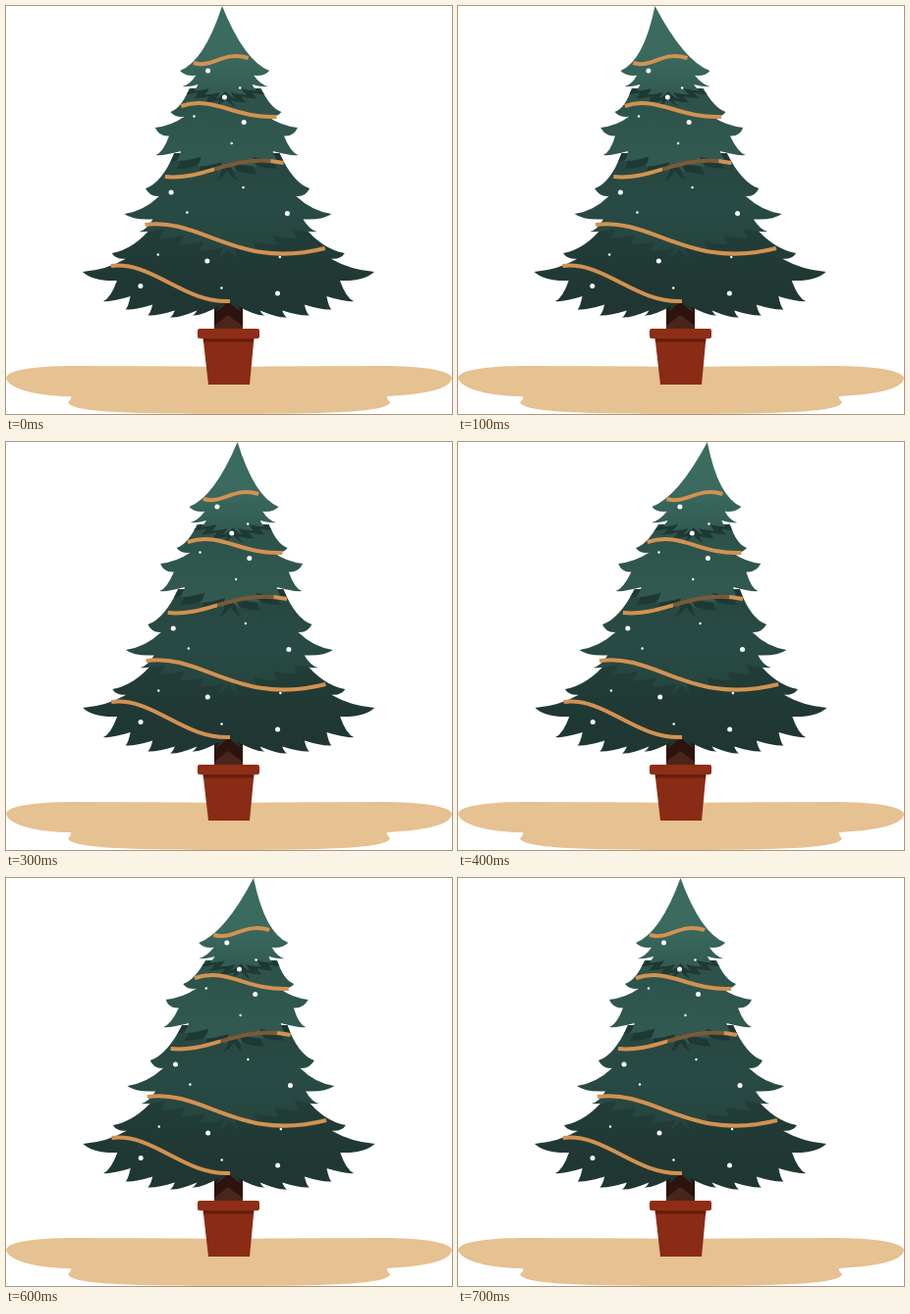
An HTML page with a canvas that plays this animation: 454 px wide and 416 px high, repeating every 800 ms.

```html
<!DOCTYPE html>
<html lang="en">
<head>
<meta charset="utf-8">
<title>Swaying tree</title>
<style>
  html, body { margin: 0; width: 100%; height: 100%; overflow: hidden; background: #fff; }
  canvas { display: block; }
</style>
</head>
<body>
<canvas id="stage" width="454" height="416"></canvas>
<script>
const ctx = document.getElementById('stage').getContext('2d');
const STEP = 100, STEPS = 8, MID = 226.5, ROOT = 325;
const GOLD = '#d39250', SHADED_GOLD = '#7c5a35', SHADOW = '#1e3833';
let lean = 0;

const lerp = (a, b, u) => a + (b - a) * u;

// Sideways shift of the tree at height y
const bend = y => lean * Math.pow(Math.max(0, ROOT - y) / ROOT, 2.25);

// Tiers from the bottom up: left branch tips, then a hem running to the middle
const tiers = [
  { colors: ['#223d38', '#1f3632'], shoulder: [150, 224], tips: [[108, 252], [78, 271], [99, 301]],
    hem: { end: [212, 311], count: 5, sag: 11, depth: 8 } },
  { colors: ['#264740', '#294b45', '#25443e'], shoulder: [173, 150], tips: [[143, 186], [121, 212], [136, 230]],
    hem: { end: [216, 256], count: 4, sag: 0, depth: 6 } },
  { colors: ['#2b5048', '#2f574e', '#325a51'], shoulder: [190, 84], tips: [[170, 108], [154, 124], [154, 152]],
    hem: { end: [216, 169], count: 3, sag: 0, depth: 7 }, shade: 8 },
  { colors: ['#3a6c60', '#3b6a5f', '#315a51'], shoulder: [MID, 0], tips: [[181, 66], [183, 82]],
    hem: { end: [216, 94], count: 3, sag: 0, depth: 5 }, shade: 8 }
];

// Cubic curves: start, two controls, end
const garlands = [
  [195, 58, 215, 64, 225, 45, 251, 53],
  [181, 102, 215, 91, 235, 115, 278, 113],
  [163, 174, 205, 178, 230, 150, 284, 160],
  [142, 223, 200, 215, 235, 270, 325, 247],
  [107, 265, 150, 260, 180, 303, 228, 301]
];

// Large and small lights take turns
const lights = [
  [209.5, 66], [241.5, 83.5], [225.5, 93], [194, 112.5], [244.5, 118.5], [231.5, 140],
  [169, 190], [242.5, 185], [287, 211.5], [185, 210.5], [205, 260], [155, 253.5],
  [137, 285.5], [279, 256], [276.5, 293], [219.5, 287.5]
];

// Left half of a tier as a start point followed by control/end pairs
function halfOutline({ shoulder, tips, hem }) {
  const pts = [shoulder];
  let tip;
  const growTo = next => {
    const from = pts[pts.length - 1];
    pts.push([lerp(from[0], next[0], 0.45), lerp(from[1], next[1], 0.85)], next);
    tip = next;
  };
  const cutTo = notch => {
    pts.push([lerp(tip[0], notch[0], 0.3), Math.max(tip[1], notch[1]) + 1], notch);
  };

  growTo(tips[0]);
  for (const next of tips.slice(1)) {
    cutTo([Math.max(tip[0], next[0]) + 14, lerp(tip[1], next[1], 0.3)]);
    growTo(next);
  }
  const start = tip;
  for (let i = 1; i <= hem.count; i++) {
    const u = i / hem.count;
    const next = [
      lerp(start[0], hem.end[0], u),
      lerp(start[1], hem.end[1], u) + hem.sag * Math.sin(Math.PI * u)
    ];
    cutTo([next[0] + 5, Math.min(tip[1], next[1]) - hem.depth + 3]);
    growTo(next);
  }
  cutTo([MID, hem.end[1] - hem.depth - 2]);
  return pts;
}

function symmetric(half, drop = 0) {
  const mirrored = half.map(([x, y]) => [2 * MID - x, y]).reverse();
  const pts = half.concat(mirrored.slice(1)).map(([x, y]) => [x + bend(y), y + drop]);
  const path = new Path2D();
  path.moveTo(...pts[0]);
  for (let i = 1; i + 1 < pts.length; i += 2) path.quadraticCurveTo(...pts[i], ...pts[i + 1]);
  path.closePath();
  return path;
}

for (const tier of tiers) tier.half = halfOutline(tier);

function fill(path, color) {
  ctx.fillStyle = color;
  ctx.fill(typeof path === 'string' ? new Path2D(path) : path);
}

function drawBase() {
  fill('M0 379C2 370 35 367 70 367Q150 367 226 368Q310 367 385 367C420 367 452 371 454 379' +
    'C453 391 425 396 388 398Q387 400 391 404C388 413 345 416 226 416C110 416 66 413 63 404' +
    'Q67 401 66 398C35 398 2 391 0 379Z', '#e6c191');
  fill('M212 298H241V330H212Z', '#2d130e');
  fill('M212 326L226 315L241 326V330H212Z', '#4a251b');
  fill('M200.5 338H252.5L248 386H206Z', '#8a2c15');
  fill('M200.5 338H252.5L252 342.5H201Z', '#681d0c');
  const rim = new Path2D();
  rim.roundRect(195, 329, 63, 10, 2);
  fill(rim, '#8f2e16');
}

function drawTier(tier, below) {
  if (tier.shade) {
    ctx.save();
    ctx.clip(symmetric(below.half));
    fill(symmetric(tier.half, tier.shade), SHADOW);
    ctx.restore();
  }
  const { colors, shoulder, hem } = tier;
  const paint = ctx.createLinearGradient(0, shoulder[1], 0, hem.end[1]);
  colors.forEach((c, i) => paint.addColorStop(i / (colors.length - 1), c));
  fill(symmetric(tier.half), paint);
}

// The middle of the third strand lies in shade
function shadedGold() {
  const dx = bend(165);
  const paint = ctx.createLinearGradient(213 + dx, 0, 271 + dx, 0);
  [GOLD, SHADED_GOLD, SHADED_GOLD, GOLD].forEach((c, i) => paint.addColorStop([0, 0.01, 0.99, 1][i], c));
  return paint;
}

function drawGarland(curve, i) {
  const p = curve.map((v, k) => k % 2 ? v : v + bend(curve[k + 1]));
  ctx.strokeStyle = i === 2 ? shadedGold() : GOLD;
  ctx.lineWidth = 4;
  ctx.beginPath();
  ctx.moveTo(p[0], p[1]);
  ctx.bezierCurveTo(...p.slice(2));
  ctx.stroke();
}

function drawLight([x, y], i) {
  ctx.fillStyle = '#fff';
  ctx.beginPath();
  ctx.arc(x + bend(y), y, i % 2 ? 1.2 : 2.5, 0, Math.PI * 2);
  ctx.fill();
}

// Swing from left to right, fall back upright, then drop to the left again
function leanAt(step) {
  const t = (step + STEPS - 1) % STEPS;
  if (t < 4) return lerp(-26, 34, (1 - Math.cos(Math.PI * Math.pow(t / 4, 0.85))) / 2);
  return t < 6 ? lerp(34, 0, ((t - 4) / 2) ** 2) : lerp(0, -26, ((t - 6) / 2) ** 2);
}

function draw(now) {
  lean = leanAt(Math.floor(now / STEP) % STEPS);
  ctx.fillStyle = '#fff';
  ctx.fillRect(0, 0, 454, 416);
  drawBase();
  tiers.forEach((tier, i) => drawTier(tier, tiers[i - 1]));
  garlands.forEach(drawGarland);
  lights.forEach(drawLight);
}

const start = performance.now();
function tick() {
  draw(performance.now() - start);
  requestAnimationFrame(tick);
}
tick();
</script>
</body>
</html>
```
